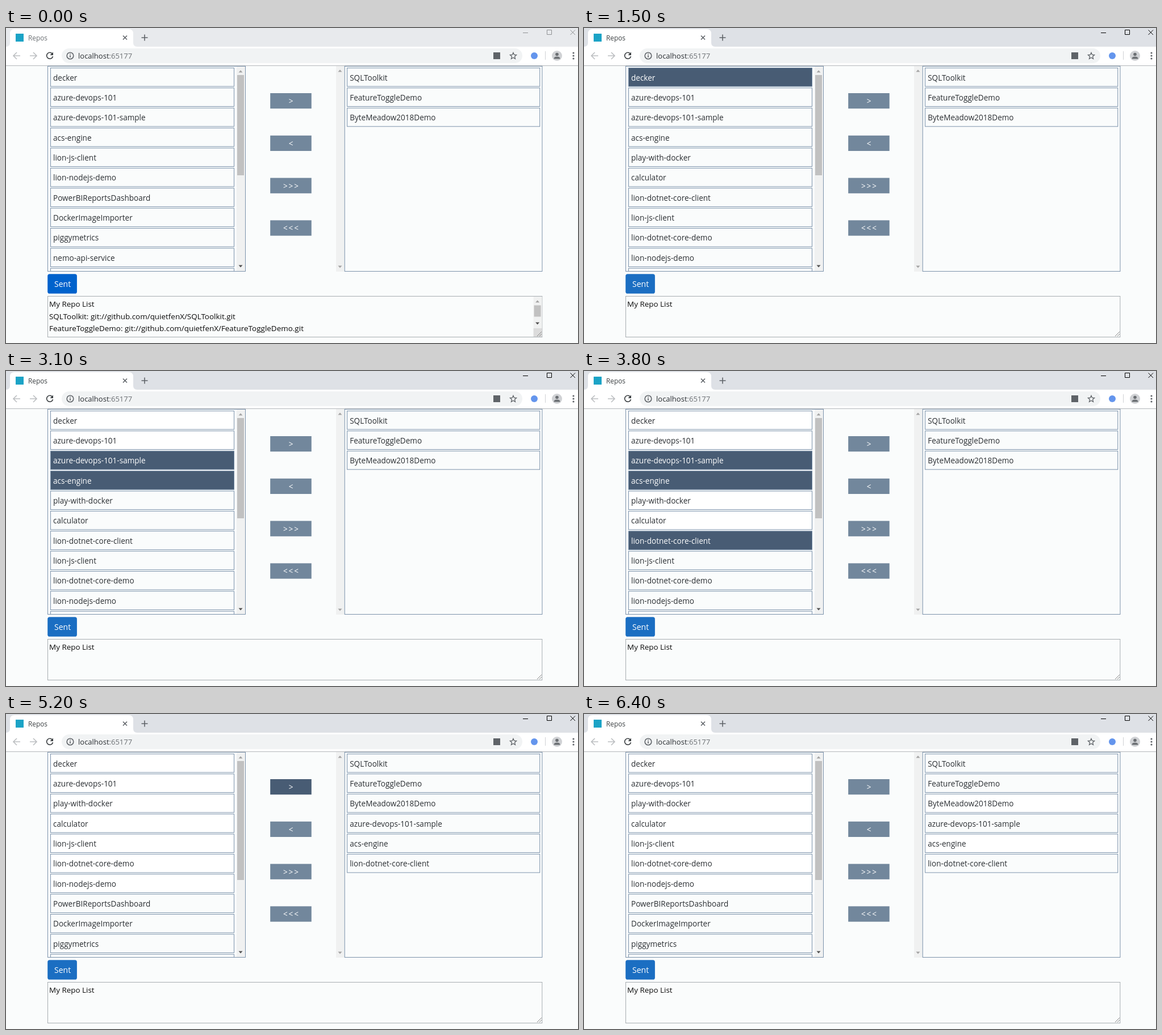
Recreate the animation shown at these times as an HTML page. Size 1007x556 px, loop 8 s.

```html
<!DOCTYPE html>
<html lang="en">
<head>
<meta charset="utf-8">
<title>Repos</title>
<style>
  html, body { margin: 0; width: 100%; height: 100%; overflow: hidden; background: #fafcfc; }
  svg { display: block; width: 1007px; height: 556px; }
  text { font: 13.55px "Open Sans", "Noto Sans", sans-serif; fill: #2a2e32; white-space: pre; }
  .log { font-size: 13.45px; fill: #0c0c0c; }
  .light { fill: #fff; }
  .spaced { letter-spacing: 2px; text-anchor: middle; }
  .line { fill: none; stroke: #5f6368; stroke-width: 1.6; }
</style>
</head>
<body>
<svg id="stage" viewBox="0 0 1007 556"></svg>
<script>
const stage = document.getElementById('stage');
const LOOP = 8000;
const ZOOM = 0.907; // one page pixel on the stage
const PAGE = '#fafcfc', BORDER = '#6f88a3', BUTTON = '#72879c', DARK = '#485c74';
const ARROW_OFF = '#a3a3a3', ARROW_ON = '#505050';
const FILL = { '.': PAGE, w: '#fff', d: DARK };

const repos = ['decker', 'azure-devops-101', 'azure-devops-101-sample', 'acs-engine',
  'play-with-docker', 'calculator', 'lion-dotnet-core-client', 'lion-js-client',
  'lion-dotnet-core-demo', 'lion-nodejs-demo', 'PowerBIReportsDashboard',
  'DockerImageImporter', 'piggymetrics', 'nemo-api-service', ''];
const without = (...hidden) => repos.filter((_, i) => !hidden.includes(i));
const chosen = ['SQLToolkit', 'FeatureToggleDemo', 'ByteMeadow2018Demo'];
const moved = [2, 3, 6];
const gitLine = name => `${name}: git://github.com/quietfenX/${name}.git`;

// Each step overrides part of the state. Row marks: . plain, w white, d dark.
const steps = [
  { at: 0, left: without(4, 5, 6, 8), right: chosen, leftMarks: '', rightMarks: '', thumb: 177,
    active: false, reload: false, ring: false, sent: '#0062cc', pressed: false,
    log: ['My Repo List', ...chosen.slice(0, 2).map(gitLine)] },
  { at: 300, leftMarks: 'd' },
  { at: 600, leftMarks: '' },
  { at: 700, reload: true },
  { at: 1000, active: true, ring: true },
  { at: 1200, left: [], right: [], thumb: 0, ring: false, sent: '#1b6ec2', log: ['My Repo List'] },
  { at: 1500, left: repos, right: chosen, thumb: 177, reload: false, leftMarks: 'd' },
  { at: 1700, leftMarks: 'wd' },
  { at: 2000, leftMarks: 'wwd' },
  { at: 3100, leftMarks: 'wwdd' },
  { at: 3500, leftMarks: 'wwddd' },
  { at: 3600, leftMarks: 'wwddwd' },
  { at: 3800, leftMarks: 'wwddwwd' },
  { at: 4200, leftMarks: 'wwddwdd' },
  { at: 4300, leftMarks: 'wwddwwd' },
  { at: 4700, pressed: true },
  { at: 5200, left: without(...moved), right: [...chosen, ...moved.map(i => repos[i])],
    leftMarks: 'wwwwwww', thumb: 210 },
  { at: 5900, pressed: false, rightMarks: '..d' },
  { at: 6300, rightMarks: '..w.d' },
  { at: 6400, rightMarks: '..w.w' },
];

const rect = (x, y, w, h, fill, more = '') =>
  `<rect x="${x}" y="${y}" width="${w}" height="${h}" fill="${fill}" ${more}/>`;
const frame = (x, y, w, h, fill, stroke) =>
  rect(x + ZOOM / 2, y + ZOOM / 2, w - ZOOM, h - ZOOM, fill, `stroke="${stroke}" stroke-width="${ZOOM}"`);
const path = (d, style = '') => `<path class="line" d="${d}" style="${style}"/>`;
const dot = (x, y, r, fill) => `<circle cx="${x}" cy="${y}" r="${r}" fill="${fill}"/>`;
const label = (x, y, html, cls = '', style = '') =>
  `<text x="${x}" y="${y}" class="${cls}" style="${style}">${html}</text>`;
const arrow = (x, y, dir, fill) =>
  `<path d="M${x - 3.5} ${y - 2 * dir}h7l-3.5 ${4 * dir}z" fill="${fill}"/>`;

function chrome({ active, reload }) {
  const nav = (x, dir) =>
    path(`M${x - 6 * dir} 49H${x + 6 * dir}M${x} 43l${6 * dir} 6l${-6 * dir} 6`, 'stroke:#bcbec1');
  return rect(0, 0, 1007, 33, active ? '#dee1e6' : '#e8eaed')
    + '<path d="M0 33q7 0 7-7V10q0-8 8-8H216q8 0 8 8V26q0 7 7 7z" fill="#fff"/>'
    + rect(0, 33, 1007, 33, '#fff') + rect(0, 66, 1007, 1, '#b4b7ba')
    + rect(17, 10, 14, 14, '#1ba3c6')
    + label(39, 22, 'Repos', '', `font-size:11.8px;fill:${active ? '#3c4043' : '#6b6f73'}`)
    + path('M206 13.5l7 7m0-7l-7 7M238.5 17h11m-5.5-5.5v11')
    + path('M910 8.5h9M952.5 3.5h8v8h-8zM993.5 3.5l8.5 8.5m0-8.5l-8.5 8.5',
        `stroke:${active ? '#000' : '#8f9193'};stroke-width:1`)
    + nav(19, -1) + nav(48, 1)
    + (reload ? dot(77, 49, 13, '#dfe0e2') : '')
    + path('M81.3 45.2A5.5 5.5 0 1 0 82.5 50', 'stroke:#3c4043')
    + '<path d="M83 42.5v5.5h-5.5z" fill="#3c4043"/>'
    + rect(98, 36, 811, 26, '#f1f3f4', 'rx="13"')
    + '<circle class="line" cx="113" cy="49" r="5.8"/>'
    + path('M113 48v4M113 45.3v1.5')
    + label(127, 53.5, 'localhost<tspan fill="#6b6f73">:65177</tspan>', '', 'font-size:13px')
    + rect(858, 43, 12, 12, '#5f6368')
    + path('M893 43.5l1.6 3.7l4 .4l-3 2.7l.9 4l-3.5-2.1l-3.5 2.1l.9-4l-3-2.7l4-.4z', 'stroke-width:1.3')
    + dot(930, 49, 6, '#6495ed') + rect(949, 41, 1, 15, '#cfd1d4')
    + dot(970, 49, 9, '#d0d2d5') + dot(970, 46.5, 2.8, '#6b6f73')
    + '<path d="M964.5 54.5q0-4 5.5-4t5.5 4z" fill="#6b6f73"/>'
    + [44, 49, 54].map(y => dot(999, y, 1.6, '#5f6368')).join('');
}

function rows(names, marks, x, w) {
  return names.slice(0, 11).map((name, i) => {
    const y = 70 + 39 * ZOOM * i, mark = marks[i] || '.';
    return frame(x, y, w, 37 * ZOOM, FILL[mark], BORDER)
      + (i < 10 ? label(x + 5, y + 22.5, name, mark === 'd' ? 'light' : '') : '');
  }).join('');
}

function scrollbar(x, top, bottom, thumbTop, thumb, upInk, downInk) {
  return rect(x, top, 15, bottom - top, '#f0f1f1')
    + (thumb ? rect(x + 1, thumbTop, 12, thumb, '#c1c1c1') : '')
    + arrow(x + 7, top + 8.5, -1, upInk) + arrow(x + 7, bottom - 8.5, 1, downInk);
}

function buttons(pressed) {
  return ['&gt;', '&lt;', '&gt;&gt;&gt;', '&lt;&lt;&lt;'].map((html, i) => {
    const y = 115 + 74.8 * i;
    return rect(465.2, y, 80 * ZOOM, 30 * ZOOM, pressed && !i ? DARK : BUTTON)
      + label(502.5, y + 19, html, 'light spaced');
  }).join('');
}

function lists(s) {
  return frame(73, 67, 349, 363, PAGE, BORDER)
    + '<clipPath id="view"><path d="M74 68h869v361H74z"/></clipPath><g clip-path="url(#view)">'
    + rows(s.left, s.leftMarks, 78, 324) + '</g>'
    + scrollbar(406, 68, 429, 83, s.thumb, ARROW_OFF, s.thumb ? ARROW_ON : ARROW_OFF)
    + buttons(s.pressed)
    + scrollbar(581, 67, 430, 0, 0, ARROW_OFF, ARROW_OFF)
    + frame(595.8, 67, 348.6, 363, PAGE, BORDER)
    + rows(s.right, s.rightMarks, 600.2, 340);
}

function footer({ sent, ring, log }) {
  return (ring ? rect(70.5, 431.5, 57, 40, '#8fc3ff', 'rx="6"') : '')
    + rect(73.2, 434.3, 57 * ZOOM, 38 * ZOOM, sent, 'rx="3.6"')
    + label(85, 457, 'Sent', 'light', 'font-size:14px')
    + frame(73, 473, 871.3, 73, PAGE, '#a0a5aa')
    + log.map((str, i) => label(76, 492 + 21.7 * i, str, 'log')).join('')
    + (log.length > 1
      ? scrollbar(928.6, 474, 530, 489.5, 20, ARROW_OFF, ARROW_ON) + rect(928.6, 530, 15, 15, '#dcdcdc')
      : '')
    + path('M935 544l8-8M939 544l4-4', 'stroke:#858585;stroke-width:1');
}

let shown = 0;
function draw(t) {
  const past = steps.filter(step => step.at <= t);
  if (past.length === shown) return;
  shown = past.length;
  const state = Object.assign({}, ...past);
  stage.innerHTML = chrome(state) + lists(state) + footer(state);
}

const start = performance.now();
function tick() {
  draw((performance.now() - start) % LOOP);
  requestAnimationFrame(tick);
}
tick();
</script>
</body>
</html>
```
